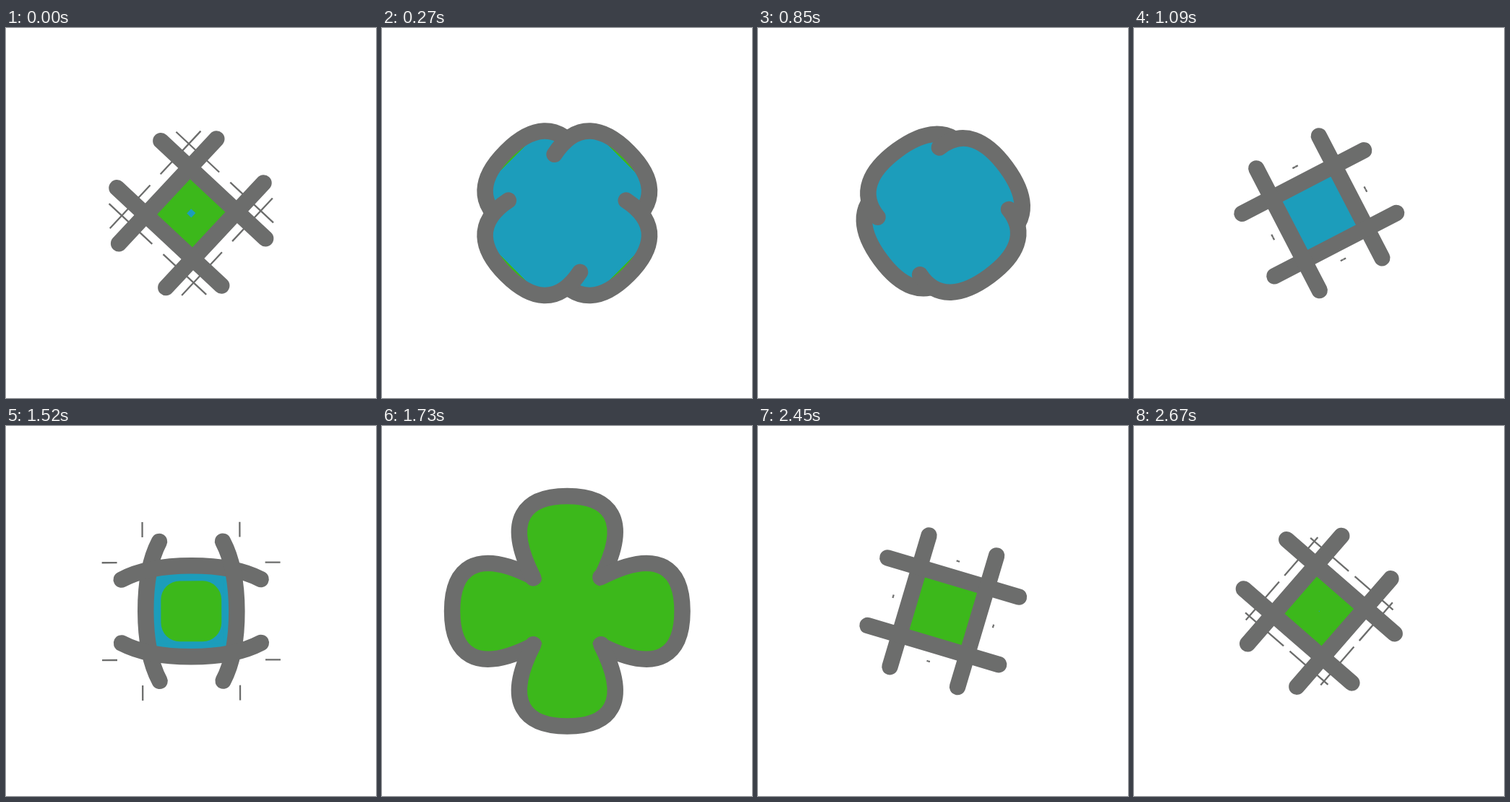
Write an HTML page with a canvas that moves like this. It is 512 px wide and 512 px high and loops after 2.73 s.

```html
<!DOCTYPE html>
<html lang="en">
<head>
<meta charset="utf-8">
<title>Clover loop</title>
<style>
  html, body { margin: 0; width: 100%; height: 100%; overflow: hidden; background: #fff; }
  canvas { display: block; width: 512px; height: 512px; }
</style>
</head>
<body>
<canvas id="stage" width="512" height="512"></canvas>
<script>
const ctx = document.getElementById('stage').getContext('2d');
const LOOP = 2730, HALF = LOOP / 2;
const SPIN_START = 612, SPIN_TIME = 1150, SPIN = 405;
const GRAY = '#6c6d6c';
const FILLS = ['#1c9dbb', '#3cb81b'];

const clamp = x => Math.min(1, Math.max(0, x));
const mix = (a, b, k) => a + (b - a) * k;
const span = (t, from, to) => clamp((t - from) / (to - from));
const inOut = (x, n) => x < .5 ? (2 * x) ** n / 2 : 1 - (2 - 2 * x) ** n / 2;

// Piecewise linear track of [time, value] points
function track(points, t) {
  const i = points.findIndex(p => p[0] > t);
  if (i === 0) return points[0][1];
  if (i < 0) return points[points.length - 1][1];
  const [t0, v0] = points[i - 1], [t1, v1] = points[i];
  return mix(v0, v1, (t - t0) / (t1 - t0));
}

const OFFSET = [[0, 44.6], [155, 44], [365, 46], [550, 42.8], [845, 49.5],
  [1090, 48.8], [1305, 45.2], [1365, 44.6]];
const TAIL = [[1080, 0], [1200, 1.5], [1305, 5.5], [1365, 10], [1440, 40],
  [1520, 102], [1570, 128]];

// 0 is the straight lattice, 1 the open flower
function bloom(t) {
  return t < SPIN_START ? inOut(span(t, 42, 460), 2) : 1 - span(t, SPIN_START, 1069);
}

function reach(t) {
  return t < SPIN_START
    ? mix(99, 42.8, inOut(span(t, 63, 475), 3))
    : mix(99, 42.8, (1 - span(t, SPIN_START, 1267)) ** 2);
}

function angle(t, half) {
  const left = s => SPIN * (1 - span(s, SPIN_START, SPIN_START + SPIN_TIME)) ** 5;
  const rest = half ? 0 : 45;
  return t < SPIN_START ? rest - left(t + HALF) : rest + SPIN - left(t);
}

function quarters(draw) {
  for (let i = 0; i < 4; i++) {
    ctx.save();
    ctx.rotate((i - 1) * Math.PI / 2);
    draw();
    ctx.restore();
  }
}

function petalPath(a, b, p) {
  const k = mix(33, 60, p), m = mix(66, 92, p);
  const n = mix(b, 138, p), top = mix(b, 172, p);
  ctx.beginPath();
  ctx.moveTo(-a, -b);
  ctx.bezierCurveTo(-m, -n, -k, -top, 0, -top);
  ctx.bezierCurveTo(k, -top, m, -n, a, -b);
}

function seed(size) {
  ctx.beginPath();
  ctx.roundRect(-size, -size, 2 * size, 2 * size, size * .62 * clamp(size / 30));
  ctx.fill();
}

function sparks(t, dist) {
  const s = t < SPIN_START ? t + HALF : t;
  if (s < 1080 || s > 1570) return;
  const head = 128 * (1 - (1 - span(s, 1080, 1570)) ** 1.45);
  const tail = track(TAIL, s);
  ctx.lineWidth = 2.3;
  ctx.lineCap = 'butt';
  quarters(() => {
    ctx.beginPath();
    for (const side of [-1, 1]) {
      ctx.moveTo(side * tail, -dist);
      ctx.lineTo(side * head, -dist);
    }
    ctx.stroke();
  });
}

function render(time) {
  const half = time < HALF ? 0 : 1;
  const t = time - half * HALF;
  const p = bloom(t), a = reach(t), b = track(OFFSET, t);
  const opening = t < SPIN_START;
  const under = opening ? 1 - half : half;
  const base = FILLS[under], fresh = FILLS[1 - under];
  const grow = opening ? t : t - HALF;
  const size = 41.5 * (Math.max(0, grow + 110) / 265) ** 2.6;
  const layered = p > .3;
  const petal = () => petalPath(a, b, p);

  ctx.setTransform(1, 0, 0, 1, 0, 0);
  ctx.fillStyle = '#fff';
  ctx.fillRect(0, 0, 512, 512);
  ctx.translate(256.3, 256.3);
  ctx.rotate(angle(t, half) * Math.PI / 180);
  ctx.strokeStyle = GRAY;

  sparks(t, b + 23.4);

  // Centre, slightly oversized so that no seam shows
  const c = b + 2;
  ctx.fillStyle = base;
  ctx.fillRect(-c, -c, 2 * c, 2 * c);
  if (!layered) quarters(() => { petal(); ctx.fill(); });
  ctx.save();
  if (layered) {
    ctx.beginPath();
    ctx.rect(-c, -c, 2 * c, 2 * c);
    ctx.clip();
  }
  ctx.fillStyle = fresh;
  seed(size);
  ctx.restore();

  // Open petals overlap: each one hides the ends of those before it
  const paint = ctx.createLinearGradient(0, 0, 0, -200);
  const edge = clamp(size / 200);
  paint.addColorStop(0, size > 0 ? fresh : base);
  paint.addColorStop(edge, size > 0 ? fresh : base);
  paint.addColorStop(edge, edge < 1 ? base : fresh);

  ctx.lineWidth = 22.5;
  ctx.lineCap = 'round';
  quarters(() => {
    petal();
    if (layered) {
      ctx.fillStyle = paint;
      ctx.fill();
    }
    ctx.stroke();
  });
}

const start = performance.now();
function tick() {
  render((performance.now() - start) % LOOP);
  requestAnimationFrame(tick);
}
tick();
</script>
</body>
</html>
```
